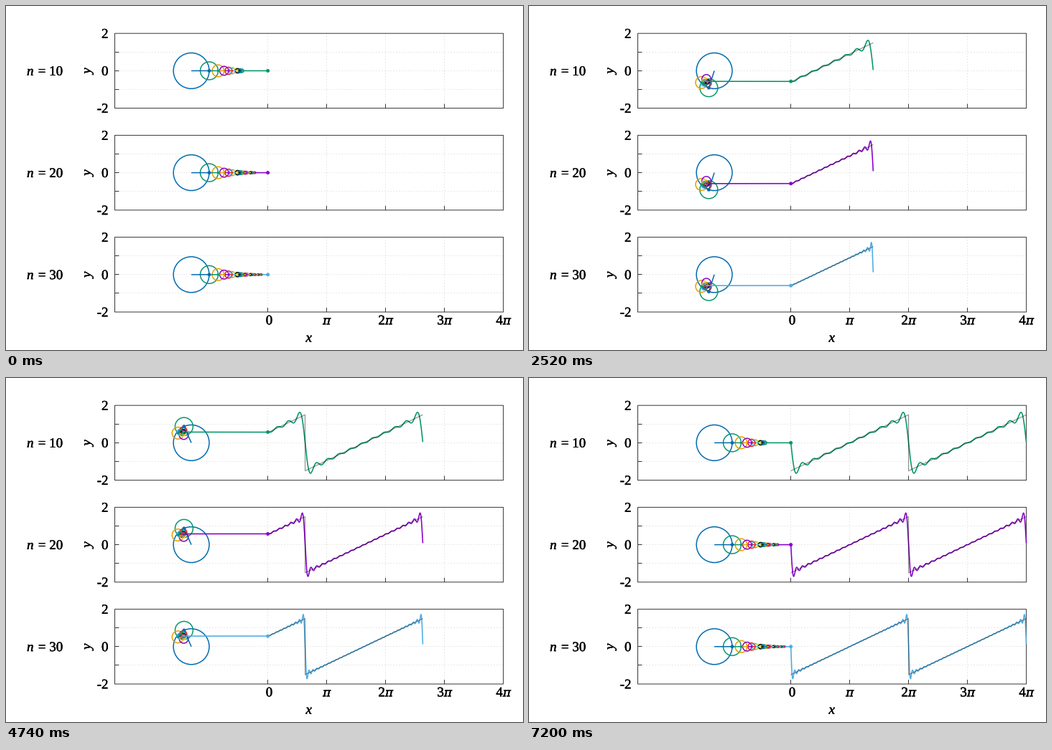
Recreate the animation shown at these times as a matplotlib script. Size 720 by 480 pixels, loop 7.22 s.

```python
import numpy as np
import matplotlib.pyplot as plt
from matplotlib.animation import FuncAnimation
from matplotlib.collections import EllipseCollection, LineCollection
from matplotlib.patheffects import withStroke

plt.rcParams["path.snap"] = False

W, H, DPI = 720, 480, 100
PX = 72 / DPI                       # one pixel in points
FRAMES, STEP, SUB = 361, 2, 8       # degrees per frame, samples per frame
LEFT, RIGHT = 151.5, 692.6          # x from -2.6 pi to 4 pi
UNIT = (RIGHT - LEFT) / (6.6 * np.pi)
X0 = RIGHT - 4 * np.pi * UNIT
CX = (LEFT + X0) / 2                # hub of the circles
AMP = 1.5
ROWS = [(10 * (r + 1), 90.4 + 142.2 * r) for r in range(3)]
PALETTE = ["#006bb0", "#05976c", "#e69f00", "#8a00cc",
           "#e51e10", "#4eade6", "#f0e442", "#000000"]
INK = "#383838"
SERIF = "Liberation Serif"


def color(k):
    return PALETTE[(k - 1) % 8]


fig = plt.figure(figsize=(W / DPI, H / DPI), dpi=DPI, facecolor="white")
ax = fig.add_axes([0, 0, 1, 1])
ax.set_xlim(0, W)
ax.set_ylim(H, 0)
ax.axis("off")


def label(x, y, s, ha="left", italic=False, family=SERIF, size=19, **kw):
    ax.text(x, y, s, ha=ha, va=kw.pop("va", "baseline"), family=family,
            style="italic" if italic else "normal",
            fontsize=size * PX, color="black",
            path_effects=[withStroke(linewidth=0.4 * PX,
                                     foreground="black")], **kw)


def draw_static():
    grid, frame = [], []
    for n, mid in ROWS:
        top, bottom = mid - 2 * UNIT, mid + 2 * UNIT
        frame.append([(LEFT, top), (RIGHT, top), (RIGHT, bottom),
                      (LEFT, bottom), (LEFT, top)])
        for v in (-1, 0, 1):
            y = np.floor(mid - v * UNIT) + 0.5
            grid.append([(LEFT, y), (RIGHT, y)])
            frame.append([(LEFT, y), (LEFT + 6, y)])
        for m in range(4):
            x = np.floor(X0 + m * np.pi * UNIT) + 0.5
            grid.append([(x, top), (x, bottom)])
            frame.append([(x, bottom), (x, bottom - 6)])
        for v in (2, 0, -2):
            label(142.5, mid - v * UNIT + 6.3, str(v), "right")
        label(29, mid + 6.3, "n", italic=True)
        label(79.3, mid + 6.3, f"= {n}", "right")
        label(113.3, mid, "y", "center", True, rotation=90, va="center")
    ax.add_collection(LineCollection(grid, colors="#d4d4d4", linewidths=PX,
                                     linestyles=[(0, (1, 3))], zorder=1))
    ax.add_collection(LineCollection(frame, colors=INK, linewidths=PX,
                                     zorder=2))
    label(366.5, 444.3, "0", "center")
    for m in range(1, 5):
        x = X0 + m * np.pi * UNIT
        if m > 1:
            label(x - 0.7, 444.3, str(m), "right")
        label(x - (5.5 if m == 1 else 0.7), 444.3, "π", italic=True,
              family="DejaVu Serif", size=17)
    label(421.7, 468.5, "x", "center", True)


draw_static()

# Partial sums and the ideal sawtooth
deg = np.arange((FRAMES - 1) * SUB + 1) * STEP / SUB
theta = np.radians(deg)
radius = 2 * AMP / np.pi * UNIT
chains = []
for n, _ in ROWS:
    k = np.arange(1, n + 1)
    arms = radius / k * np.exp(1j * np.outer(theta, k))
    hub = np.zeros((len(theta), 1))
    chains.append(np.hstack([hub, np.cumsum(arms, axis=1)]))
saw = AMP * (1 - 2 * (360 - (-deg) % 360) / 360)
saw[0] = AMP

orders = np.concatenate([np.arange(1, n + 1) for n, _ in ROWS])
colors = [color(k) for k in orders]
size = 2 * radius / orders
rings = EllipseCollection(size, size, np.zeros(len(size)), units="xy",
                          offsets=np.zeros((len(size), 2)),
                          offset_transform=ax.transData, facecolors="none",
                          edgecolors=colors, linewidths=1.5 * PX, zorder=3)
spokes = LineCollection([], colors=colors, linewidths=1.5 * PX, zorder=4)
ax.add_collection(rings)
ax.add_collection(spokes)
joints = ax.scatter(np.zeros(len(size)), np.zeros(len(size)),
                    s=(4.8 * PX) ** 2 / orders, c=colors, linewidths=0,
                    zorder=5)
waves = [ax.plot([], [], color=color(n), lw=1.6 * PX, zorder=6,
                 solid_capstyle="butt")[0] for n, _ in ROWS]
ideals = [ax.plot([], [], color="black", alpha=0.4, lw=1.3 * PX, zorder=7,
                  solid_capstyle="butt")[0] for _ in ROWS]
pens = ax.scatter([X0] * 3, [0] * 3, s=(5 * PX) ** 2,
                  c=[color(n) for n, _ in ROWS], linewidths=0, zorder=8)


def update(i):
    j = i * SUB
    centers, tips, ends = [], [], []
    xs = X0 + theta[:j + 1] * UNIT
    for (n, mid), chain, wave, ideal in zip(ROWS, chains, waves, ideals):
        pts = np.column_stack([CX + chain[j].real, mid - chain[j].imag])
        centers.append(pts[:-1])
        tips.append(pts[1:])
        tip_x, tip_y = pts[-1]
        # The trace starts one sample after zero
        ys = mid - chain[j:0:-1, -1].imag
        wave.set_data(np.r_[tip_x, X0, xs[:-1]], np.r_[tip_y, tip_y, ys])
        ideal.set_data(xs, mid - saw[j::-1] * UNIT)
        ends.append((X0, tip_y))
    centers, tips = np.vstack(centers), np.vstack(tips)
    rings.set_offsets(centers)
    spokes.set_segments(np.stack([centers, tips], axis=1))
    joints.set_offsets(tips)
    pens.set_offsets(ends)
    return [rings, spokes, joints, pens, *waves, *ideals]


anim = FuncAnimation(fig, update, frames=FRAMES, interval=20, repeat=True,
                     repeat_delay=0, blit=False)
plt.show()
```
